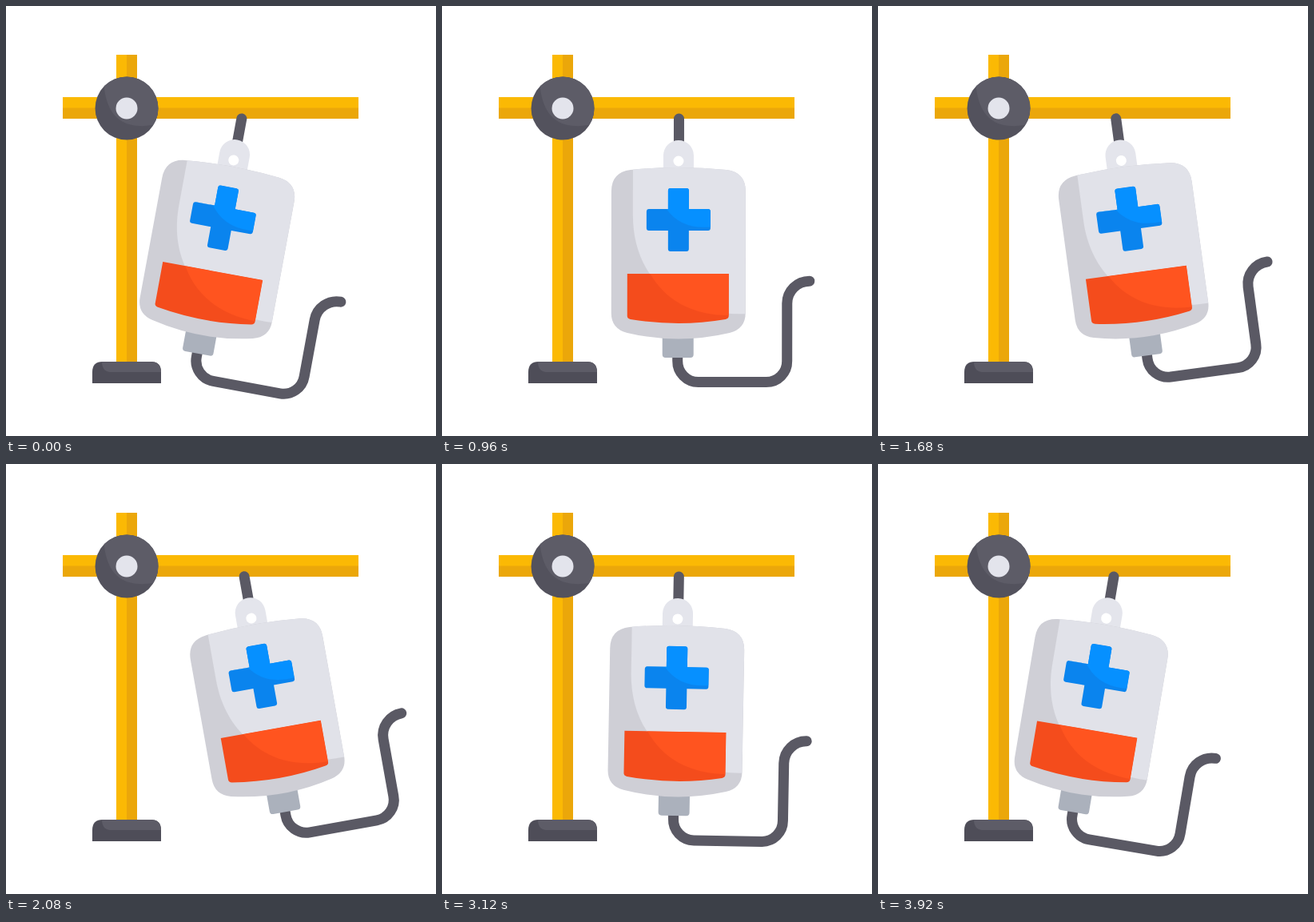
An HTML page for the animation above (4 s loop, 538 px wide and 538 px high).

```html
<!DOCTYPE html>
<html lang="en">
<head>
<meta charset="utf-8">
<title>Swinging drip bag</title>
<style>
  html, body { margin: 0; width: 100%; height: 100%; overflow: hidden; background: #fff; }
  svg { display: block; width: 100vw; height: 100vh; }
</style>
</head>
<body>
<svg viewBox="0 0 538 538">
  <defs>
    <clipPath id="bagClip"><path id="bag" d="M212 232Q212 208 236 205Q296 199 356 205Q380 208 380 232V384Q380 404 360 409Q296 424 232 409Q212 404 212 384Z"/></clipPath>
    <clipPath id="fluidClip"><path id="fluid" d="M232 335H359V388Q359 391 355 392Q296 402 236 392Q232 391 232 388Z"/></clipPath>
    <clipPath id="crossClip"><path id="cross" d="M286 228H306Q309 228 309 231V254H333Q336 254 336 257V278Q336 281 333 281H309V304Q309 307 306 307H286Q283 307 283 304V281H259Q256 281 256 278V257Q256 254 259 254H283V231Q283 228 286 228Z"/></clipPath>
    <clipPath id="knobClip"><circle cx="151" cy="128" r="39.5"/></clipPath>
  </defs>

  <!-- stand -->
  <path fill="#fbb904" d="M138 61H164V446H138Z"/>
  <path fill="#eba70a" d="M151 61H164V446H151Z"/>
  <path fill="#fbb904" d="M71 114H441V128H71Z"/>
  <path fill="#eba70a" d="M71 127.500H441V141H71Z"/>
  <g clip-path="url(#knobClip)">
    <path fill="#53525d" d="M110 87H192V169H110Z"/>
    <path fill="#5d5c67" d="M122 80Q120 148 166 150Q180 151 195 146V80Z"/>
  </g>
  <circle cx="151" cy="128" r="13.500" fill="#e3e4ec"/>
  <path fill="#4e4d58" d="M108 472V458Q108 445 121 445H181Q194 445 194 458V472Z"/>
  <path fill="#5d5c67" d="M120 445H181Q194 445 194 458H130Q120 457 120 445Z"/>

  <!-- hanging bag -->
  <g id="swing">
    <g fill="none" stroke="#5a5964" stroke-width="13" stroke-linecap="round">
      <path d="M296.500 141V178"/>
      <path d="M295 438V444A26 26 0 0 0 321 470.500H406A26 26 0 0 0 432 444V372A28 28 0 0 1 460 344"/>
    </g>
    <path fill="#abb1bc" d="M276 408H315V436Q315 440 311 440H280Q276 440 276 436Z"/>
    <path fill="#e4e5ec" d="M277 208V187A19 19 0 0 1 315 187V208Z"/>
    <circle cx="296" cy="194" r="6.500" fill="#fff"/>
    <use href="#bag" fill="#cfcfd6"/>
    <path clip-path="url(#bagClip)" fill="#e1e2e9" d="M239 195V262C239 330 282 390 385 385V195Z"/>
    <use href="#cross" fill="#0a84ee"/>
    <path clip-path="url(#crossClip)" fill="#0690ff" d="M252 220H340V276Q300 281 281 254H252Z"/>
    <use href="#fluid" fill="#f44c1c"/>
    <path clip-path="url(#fluidClip)" fill="#ff541f" d="M258 330C276 366 312 388 362 387V330Z"/>
  </g>
</svg>
<script>
  const LOOP = 4000, STEP = 80, TURN = 1990;
  const RIGHT = 10.45, LEFT = -11.1;
  const swing = document.getElementById('swing');
  const start = performance.now();

  // Constant speed out and back, held for each step.
  function angleAt(ms) {
    const t = Math.floor((ms % LOOP) / STEP) * STEP;
    const k = t < TURN ? t / TURN : (LOOP - t) / (LOOP - TURN);
    return RIGHT + (LEFT - RIGHT) * k;
  }

  function draw(now) {
    const angle = angleAt(Math.max(0, now - start));
    swing.setAttribute('transform', `rotate(${angle.toFixed(3)} 296 132)`);
    requestAnimationFrame(draw);
  }
  draw(start);
</script>
</body>
</html>
```
